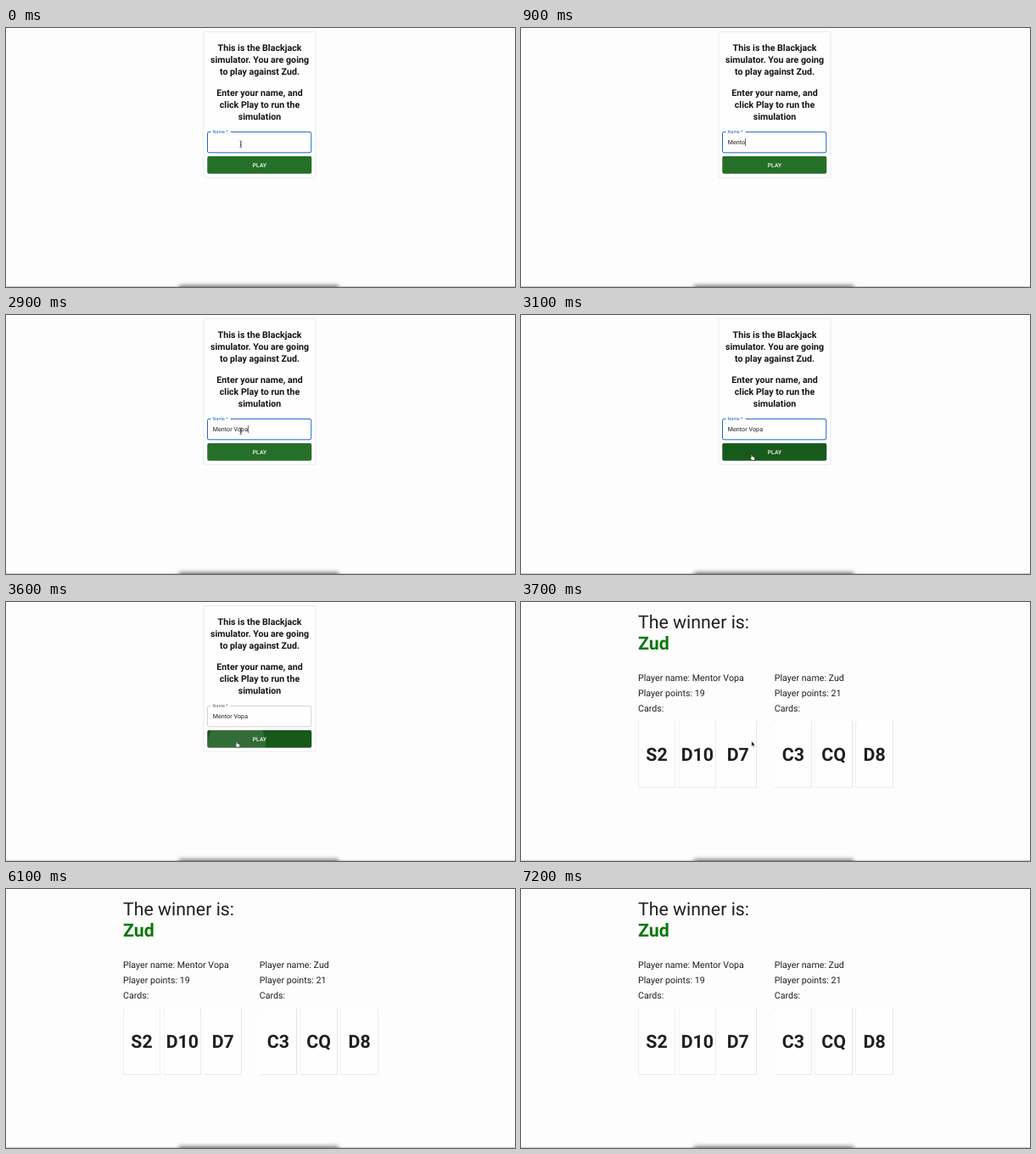
An HTML page that plays this animation: 600x305 px, repeating every 7400 ms.

```html
<!DOCTYPE html>
<html lang="en">
<head>
<meta charset="utf-8">
<title>Blackjack simulator</title>
<style>
  html, body { margin: 0; width: 100%; height: 100%; overflow: hidden; background: #fdfdfd; }
  svg { display: block; width: 600px; height: 305px; }
  text { font-family: Roboto, sans-serif; fill: #1f1f1f; white-space: pre; text-rendering: geometricPrecision; }
  .heading { font-size: 10.67px; font-weight: 700; text-anchor: middle; fill: #151515; }
  .label { font-size: 5.33px; letter-spacing: .00938em; }
  .input { font-size: 7.11px; letter-spacing: .00938em; }
  .play { font-size: 6.67px; font-weight: 500; letter-spacing: .02857em; text-anchor: middle; fill: #fff; }
  .title { font-size: 21.33px; }
  .winner { font-weight: 700; fill: #0a780a; }
  .info { font-size: 10.67px; }
  .rank { font-size: 21.33px; font-weight: 700; text-anchor: middle; }
  .panel { fill: #fefefe; stroke: #e2e2e2; stroke-width: .7; }
  .raised { filter: drop-shadow(0 .6px .6px rgba(0, 0, 0, .36)); }
  .dock { filter: blur(2.5px); }
</style>
</head>
<body>
<svg viewBox="0 0 600 305">
  <clipPath id="buttonShape"><rect x="237.4" y="151" width="122.8" height="20.6" rx="1.8"/></clipPath>

  <g id="form">
    <rect class="panel" x="233" y="4.4" width="132" height="171.8" rx="2"/>
    <g id="headings"></g>
    <path id="outline" fill="none" d="M241.5 122.4H239.3a1.8 1.8 0 0 0-1.8 1.8V145a1.8 1.8 0 0 0 1.8 1.8H358a1.8 1.8 0 0 0 1.8-1.8V124.2a1.8 1.8 0 0 0-1.8-1.8H264.7"/>
    <text id="label" class="label" x="243.6" y="124.4">Name *</text>
    <text id="input" class="input" x="243.7" y="137.1"></text>
    <rect id="caret" y="130" width=".6" height="9" fill="#111"/>
    <g class="raised"><rect id="button" x="237.4" y="151" width="122.8" height="20.6" rx="1.8"/></g>
    <circle id="ripple" cx="272" cy="167" fill="#fff" opacity=".12" clip-path="url(#buttonShape)"/>
    <text class="play" x="299" y="163.7">PLAY</text>
  </g>

  <g id="result">
    <text class="title" x="138" y="30.7">The winner is:</text>
    <text class="title winner" x="138" y="55.5">Zud</text>
  </g>

  <path id="beam" d="M275.4 132.8q1.4 0 1.4.9v6q0 .9-1.4.9M278.2 132.8q-1.4 0-1.4.9v6q0 .9 1.4.9M275.9 137.8h1.8" fill="none" stroke="#333" stroke-width=".6"/>
  <path id="hand" d="M271.2 164.8q.7-.9 1.2.2l.6 1.8 2 .5q.8.3.7 1.2l-.5 2.6h-3.2l-1.9-2.5q-.1-1 1.2-.4z" fill="#fff" stroke="#111" stroke-width=".5"/>
  <path id="arrow" d="M271.8 163.8v6.2l1.4-1.3 1 2.2.9-.4-1-2.1h1.9z" fill="#111" stroke="#fff" stroke-width=".4"/>

  <rect y="303.9" width="600" height="1.1" fill="#cfcfcf"/>
  <rect class="dock" x="204" y="303" width="188" height="8" fill="#777"/>
</svg>
<script>
const LOOP = 7400, STEP = 100;
const PLAYER = "Mentor Vopa", RIVAL = "Zud";
const KEY_TIMES = [100, 200, 500, 800, 900, 1200, 1600, 1900, 2300, 2400, 2500];
const BLUR_AT = 3500, RESULT_AT = 3700;
const el = id => document.getElementById(id);

function add(parent, tag, attrs, content = "") {
  const node = document.createElementNS("http://www.w3.org/2000/svg", tag);
  for (const key in attrs) node.setAttribute(key, attrs[key]);
  node.textContent = content;
  el(parent).append(node);
}

function addHand(x, name, points, cards) {
  [`Player name: ${name}`, `Player points: ${points}`, "Cards:"].forEach((line, i) =>
    add("result", "text", { class: "info", x, y: 93.4 + i * 17.75 }, line));
  cards.forEach((card, i) => {
    const left = x + .2 + i * 47.9;
    add("result", "rect", { class: "raised", x: left, y: 140, width: 43.6, height: 78.7, rx: 1.5, fill: "#fefefe" });
    add("result", "text", { class: "rank", x: left + 21.8, y: 186.6 }, card);
  });
}

["This is the Blackjack", "simulator. You are going", `to play against ${RIVAL}.`,
 "Enter your name, and", "click Play to run the", "simulation"].forEach((line, i) =>
  add("headings", "text", { class: "heading", x: 299, y: 26.7 + i * 14.2 + (i > 2 ? 10.6 : 0) }, line));
addHand(138, PLAYER, 19, ["S2", "D10", "D7"]);
addHand(298.8, RIVAL, 21, ["C3", "CQ", "D8"]);

const show = (id, on) => el(id).setAttribute("visibility", on ? "visible" : "hidden");
const mix = (a, b, k) => `rgb(${a.map((v, i) => Math.round(v + (b[i] - v) * k))})`;

function render(t) {
  const isForm = t < RESULT_AT, focused = t < BLUR_AT;
  el("form").style.display = isForm ? "" : "none";
  el("result").style.display = isForm ? "none" : "";
  show("beam", t < 100 || t === 2900);
  show("hand", t >= 3000 && isForm);
  show("arrow", !isForm && t < 3900);
  if (!isForm) return;

  const typed = KEY_TIMES.filter(k => k <= t).length;
  el("input").textContent = PLAYER.slice(0, typed);
  el("caret").setAttribute("x", 243.7 + el("input").getComputedTextLength());
  show("caret", typed && t < 3000);

  el("outline").setAttribute("stroke", focused ? "#1c68c4" : "#b4b4b4");
  el("outline").setAttribute("stroke-width", focused ? 1 : .6);
  el("label").style.fill = focused ? "#1c68c4" : "#666";

  const hover = Math.min(1, Math.max(0, (t - 2920) / 250));
  el("button").setAttribute("fill", mix([37, 112, 41], [23, 88, 27], 1 - (1 - hover) ** 2));
  el("ripple").setAttribute("r", 34 * Math.max(0, (t - 3400) / 200) ** 1.5);
}

const start = performance.now();
function tick() {
  const t = (performance.now() - start) % LOOP;
  render(Math.floor(t / STEP) * STEP);
  requestAnimationFrame(tick);
}
tick();
</script>
</body>
</html>
```
